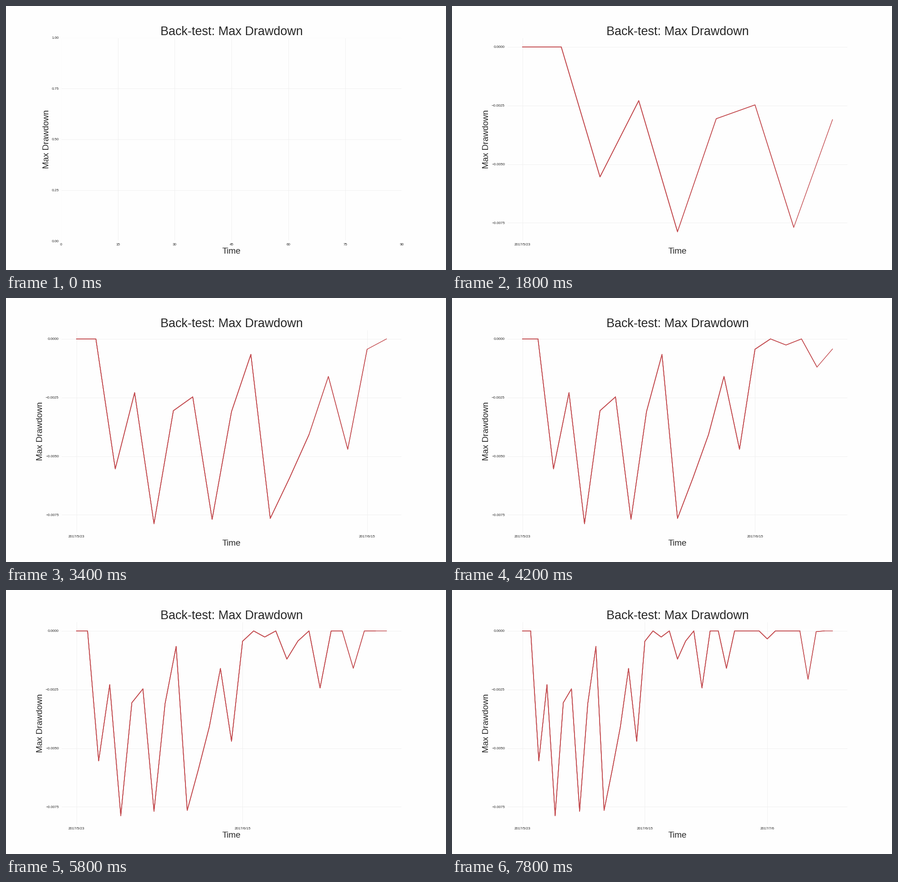
A matplotlib script that plays this animation: 966 px wide and 580 px high, repeating every 8000 ms.

```python
import matplotlib.pyplot as plt
import numpy as np
from matplotlib.animation import FuncAnimation
from matplotlib.ticker import MaxNLocator

DPI = 96
FRAMES, STEP_MS = 40, 200
PT = 1.00625
RED, INK, GRID, PAPER = "#c44e52", "#262626", "#f0f0f0", "#fefefe"

plt.rcParams.update({
    "font.family": "Liberation Sans",
    "text.color": INK, "axes.labelcolor": INK,
    "xtick.color": INK, "ytick.color": INK,
    "axes.edgecolor": PAPER, "axes.facecolor": PAPER,
    "axes.linewidth": 1.2, "axes.axisbelow": True,
    "axes.grid": True, "grid.color": GRID, "grid.linewidth": 0.75,
    "xtick.labelsize": 6 * PT, "ytick.labelsize": 6 * PT,
    "xtick.major.size": 0, "ytick.major.size": 0,
    "xtick.major.pad": 3.5 * PT, "ytick.major.pad": 3.5 * PT,
})

# Drawdown per trading day, in units of -0.0001
drawdown = -1e-4 * np.array([
    0, 0, 55.4, 22.9, 78.77, 30.6, 24.7, 76.9, 31, 6.6,
    76.5, 59.2, 40.8, 16, 47.05, 4.4, 0, 2.6, 0, 12,
    4.3, 0, 24.3, 0, 0, 15.9, 0, 0, 0, 0,
    3.4, 0, 0, 0, 0, 20.6, 0.3, 0, 0,
])
dates = ["2017/5/23", "2017/6/15", "2017/7/6"]
TICK_DAYS = 15

fig, ax = plt.subplots(figsize=(966 / DPI, 580 / DPI), dpi=DPI, facecolor=PAPER)


def padded(low, high):
    """Limits with a 5% margin; a flat range opens to +-0.055."""
    if low == high:
        return low - 0.055, high + 0.055
    pad = 0.05 * (high - low)
    return low - pad, high + pad


def draw_curve(n):
    # Older stretches are painted over again and so look a little heavier
    for lag, width in ((4, 1.65), (1, 1.55), (0, 1.45)):
        count = n - lag
        if count > 1:
            ax.plot(np.arange(count), drawdown[:count], color=RED,
                    lw=width * 72 / DPI)


def draw(n):
    ax.clear()
    ax.set_title("Back-test: Max Drawdown", fontsize=20 * PT, pad=2.3)
    ax.set_xlabel("Time", fontsize=14 * PT, labelpad=2)
    ax.set_ylabel("Max Drawdown", fontsize=14 * PT, labelpad=2)
    ax.yaxis.set_major_locator(MaxNLocator(nbins=4, steps=[1, 2, 2.5, 5, 10]))
    if n == 0:
        ax.set_xticks(range(0, 91, TICK_DAYS))
        ax.set_xlim(0, 90)
        ax.set_ylim(0, 1)
        return []
    draw_curve(n)
    days = range(0, n, TICK_DAYS)
    ax.set_xticks(days, dates[:len(days)])
    ax.set_xlim(*padded(0, n - 1))
    ax.set_ylim(*padded(drawdown[:n].min(), 0))
    return []


anim = FuncAnimation(fig, draw, frames=FRAMES, init_func=lambda: draw(0),
                     interval=STEP_MS, repeat=True, repeat_delay=0, blit=False)
plt.show()
```
